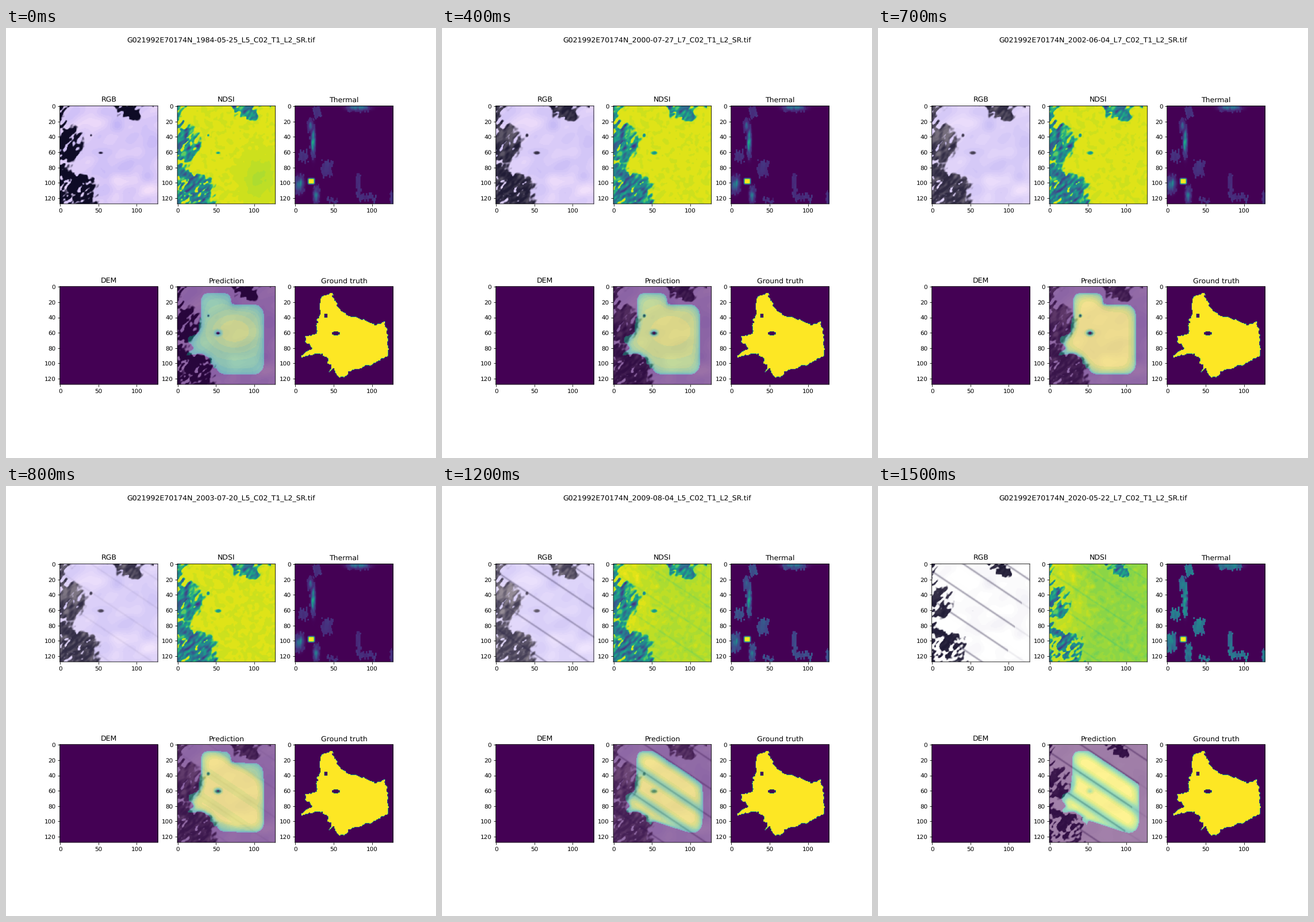
Write a matplotlib script that moves like this. It is 748 px wide and 748 px high and loops after 1600 ms.

```python
import numpy as np
import matplotlib.pyplot as plt
from matplotlib.animation import FuncAnimation
from matplotlib.path import Path

plt.rcParams["path.snap"] = False
plt.rcParams["text.hinting"] = "none"

N = 128
FRAMES = 16
Y, X = np.mgrid[0:N, 0:N].astype(float)

SCENES = [
    "1984-05-25_L5", "1990-07-16_L5", "1996-08-07_L5", "1999-07-25_L7",
    "2000-07-27_L7", "2001-06-24_L7", "2001-08-11_L7", "2002-06-04_L7",
    "2003-07-20_L5", "2005-08-01_L5", "2006-07-27_L5", "2008-07-16_L5",
    "2009-08-04_L5", "2013-06-09_L7", "2017-06-20_L7", "2020-05-22_L7",
]


def mix(a, b, t):
    return np.asarray(a) + (np.asarray(b) - np.asarray(a)) * t


def smooth(t):
    t = np.clip(t, 0, 1)
    return t * t * (3 - 2 * t)


def step(a, levels):
    return np.round(a * levels) / levels


def blur(a, su, sv=None, angle=0.0):
    sv = su if sv is None else sv
    fy, fx = np.meshgrid(np.fft.fftfreq(N), np.fft.fftfreq(N), indexing="ij")
    fu = np.cos(angle) * fx + np.sin(angle) * fy
    fv = np.cos(angle) * fy - np.sin(angle) * fx
    kernel = np.exp(-2 * np.pi ** 2 * ((su * fu) ** 2 + (sv * fv) ** 2))
    return np.fft.ifft2(np.fft.fft2(a) * kernel).real


def noise(seed, su, sv=None, angle=0.0):
    a = blur(np.random.default_rng(seed).normal(size=(N, N)), su, sv, angle)
    return (a - a.mean()) / a.std()


def bump(x, y, rx, ry):
    return np.exp(-((X - x) / rx) ** 2 - ((Y - y) / ry) ** 2)


def box(x, y, w, h, power=6):
    return abs((X - x) / w) ** power + abs((Y - y) / h) ** power < 1


# Bare rock: a ragged left margin, a ridge at the top and two outcrops
reach = np.interp(Y, [0, 12, 24, 45, 62, 74, 85, 95, 127],
                  [14, 2, 18, 30, 27, 12, 14, 44, 46])
rocks = 0.95 / (1 + np.exp((X - reach) / 5))
rocks += 0.6 * bump(15, 99, 24, 12)
rocks += 1.6 * bump(88, 8, 12, 9) + 0.8 * bump(100, 14, 6, 5)
rocks += 0.5 * np.exp(-Y / 3) * (X > 55) * (X < 122)
rocks *= 1 + 0.45 * noise(3, 3.2, 1.3, -0.8) + 0.2 * noise(4, 1.3)
rocks += 0.8 * bump(52.5, 61, 5, 2.6) + 0.7 * bump(40, 38, 2.2, 2.4)
rock_tone = noise(5, 2.4, 1.2, -0.8)
light = np.clip(0.2 + 0.25 * rock_tone + 0.7 * bump(12, 38, 16, 15), 0, 1)
near_rock = smooth(2.2 * blur((rocks > 0.5).astype(float), 5) - 0.15)

# Soft relief of the snow field
relief = (0.57 + 0.1 * noise(8, 7, 5, -0.5)
          + 0.3 * bump(40, 22, 18, 13) + 0.4 * bump(115, 112, 14, 9)
          - 0.5 * bump(75, 24, 9, 9) - 0.35 * bump(60, 93, 9, 14))
grain = noise(9, 1.8)
eastward = smooth((X - 15 + 5 * noise(10, 4)) / 50)
meadow = bump(106, 94, 20, 26)


def scan_gaps(width, fade=0.0):
    lines = np.zeros((N, N))
    for c in range(-64, 100, 37):
        d = (Y - c - 0.67 * X) / 1.2
        weight = 1 - fade * (X > 110 - 0.25 * c)
        lines = np.maximum(lines, weight * np.exp(-(d / width) ** 2))
    return lines


# Thermal patches: centre, half size, warmth
PATCHES = [
    (27, 8, 5, 8, 0), (20, 26, 4, 9, 0.3), (23, 46, 3, 22, 0.55),
    (41, 82, 7, 10, 0), (82, 103, 3, 16, 0), (94, 119, 11, 4, 0),
    (126, 120, 3, 9, 0), (82, 2, 15, 5, 0.45), (5, 102, 6, 12, 0.45),
    (27, 116, 4, 12, 0.4), (48, 123, 7, 3, 0), (10, 66, 6, 7, 0),
]
rng = np.random.default_rng(14)
ragged_x = X + np.repeat(rng.normal(0, 0.9, N // 4), 4)[:, None]
ragged_y = Y + np.repeat(rng.normal(0, 2, N // 2), 2)[None, :]
faint = np.zeros((N, N))
warm = np.zeros((N, N))
for x, y, w, h, heat in PATCHES:
    faint[(abs(ragged_x - x) < w) & (abs(ragged_y - y) < h)] = 1
    warm = np.maximum(warm, heat * bump(x, y, 0.8 * w, 0.7 * h))
faint *= 0.95 + 0.1 * noise(15, 1.2, 3)
warm *= 1 + 0.2 * noise(16, 0.8, 2)
warm = np.maximum(warm, blur(1.0 * box(20.5, 98, 4, 3.5), 0.7))

# Glacier outline
OUTLINE = [
    (47, 8), (54, 25), (68, 39.6), (78, 38.8), (106, 50), (116, 45.5),
    (120, 67), (120.6, 90), (102, 100.5), (73, 109.4), (63, 118.4),
    (56, 117.5), (49, 106), (43, 112.4), (47, 103), (41, 99), (44, 95),
    (38.8, 90.6), (31, 87), (8, 92.4), (7, 89), (22, 81), (13, 71),
    (13, 65), (27.5, 62), (28.3, 42), (32.8, 36.6), (31, 22), (36.5, 12),
]
rough = [(a + 0.6 * noise(s, 1.2)).ravel() for a, s in ((X, 21), (Y, 22))]
glacier = Path(OUTLINE).contains_points(np.column_stack(rough)).reshape(N, N)
truth = glacier & ~box(39.5, 38, 2.2, 2.4) & ~box(52.5, 61, 5, 2.4, 2)

# Prediction: rounded blocks plus the western tongue; later cut by the gaps
tongue = glacier & (X < 50)
blocks = box(81, 69, 32, 46) | box(50, 40, 20, 32)
between = (Y > 0.67 * X - 26) & (Y < 0.33 * X + 82)
later = (box(81, 69, 36, 47) | box(50, 40, 21, 32)) & between


def soften(mask):
    mask = mask.astype(float)
    return 0.5 * blur(mask, 1.5) + 0.5 * blur(mask, 8)


outcrops = 0.6 * bump(52.5, 60.5, 5, 4) + 0.45 * bump(40, 38, 2, 2)
whole = soften(blocks | tongue) - outcrops
sliced = soften(later | tongue & (X > 15)) - 0.4 * outcrops
heart = bump(74, 58, 40, 30)
wide_gaps = scan_gaps(6)


def scene(frame):
    t = frame / (FRAMES - 1)
    spring = "-05-" in SCENES[frame]
    fault = np.clip((frame - 7) / 6, 0, 1)
    fresh = spring * t

    melt = 0.43 + spring * (0.2 + 0.3 * t)
    rock = smooth((rocks - melt) / 0.4 + 0.5)
    gaps = 0.42 * fault * scan_gaps(1.2, 0.8 * fresh)

    tone = step(np.clip(relief + 0.35 * fresh, 0, 1), 9)[..., None]
    shade = mix(mix((182, 170, 245), (205, 197, 243), t), 232, 0.7 * fresh)
    snow = mix(mix((242, 222, 250), (238, 230, 255), t), 255, fresh)
    dark = mix((14, 11, 38), (85, 78, 100), t * (1 - 0.75 * spring))
    bare = mix(dark, (178, 168, 174),
               (0.8 * np.sqrt(t) * light * (1 - 0.8 * spring))[..., None])
    rgb = mix(mix(shade, snow, tone), bare, rock[..., None])
    rgb = np.clip(mix(rgb, (45, 38, 72), gaps[..., None]) / 255, 0, 1)

    ndsi = (0.94 - 0.075 * fault ** 2 * eastward - 0.03 * fresh
            - 0.06 * spring * (1 - t) * meadow
            + (0.004 + 0.01 * fault) * grain)
    ndsi = step(ndsi, 40) - 0.12 * gaps
    ndsi = mix(ndsi, np.clip(0.44 + 0.13 * rock_tone, 0.1, 0.75), rock)

    haze = 0.14 + 0.28 * np.clip((t - 0.67) / 0.33, 0, 1)
    thermal = np.maximum(haze * faint, warm)

    soft = mix(whole, sliced, fault)
    trust = mix(0.35 + 0.5 * heart, 1, min(1, 2 * t))
    trust = trust * (1 - 0.7 * fault * wide_gaps) * (1 - 0.7 * near_rock)
    level = 0.5 + np.clip((soft - 0.5) * 1.1, 0, 0.5) * trust
    pred = np.where(soft > 0.5, step(level, 20), 0)
    return rgb, ndsi, thermal, pred


fig, axes = plt.subplots(2, 3, figsize=(10, 10), dpi=74.8)
heading = fig.suptitle("")
panels = axes.ravel()
titles = ["RGB", "NDSI", "Thermal", "DEM", "Prediction", "Ground truth"]
for ax, title in zip(panels, titles):
    ax.set_title(title)


def show(ax, data, **kw):
    return ax.imshow(data, cmap="viridis", vmin=0, vmax=1, **kw)


blank = np.zeros((N, N))
color = np.zeros((N, N, 3))
rgb_view = panels[0].imshow(color)
ndsi_view = show(panels[1], blank)
thermal_view = show(panels[2], blank)
show(panels[3], blank)
under_view = panels[4].imshow(color)
pred_view = show(panels[4], blank, alpha=0.5)
show(panels[5], truth.astype(float))


def update(frame):
    rgb, ndsi, thermal, pred = scene(frame)
    rgb_view.set_data(rgb)
    under_view.set_data(rgb)
    ndsi_view.set_data(ndsi)
    thermal_view.set_data(thermal)
    pred_view.set_data(pred)
    heading.set_text(f"G021992E70174N_{SCENES[frame]}_C02_T1_L2_SR.tif")
    return rgb_view, under_view, ndsi_view, thermal_view, pred_view, heading


anim = FuncAnimation(fig, update, frames=FRAMES, interval=100, repeat=True)
plt.show()
```
